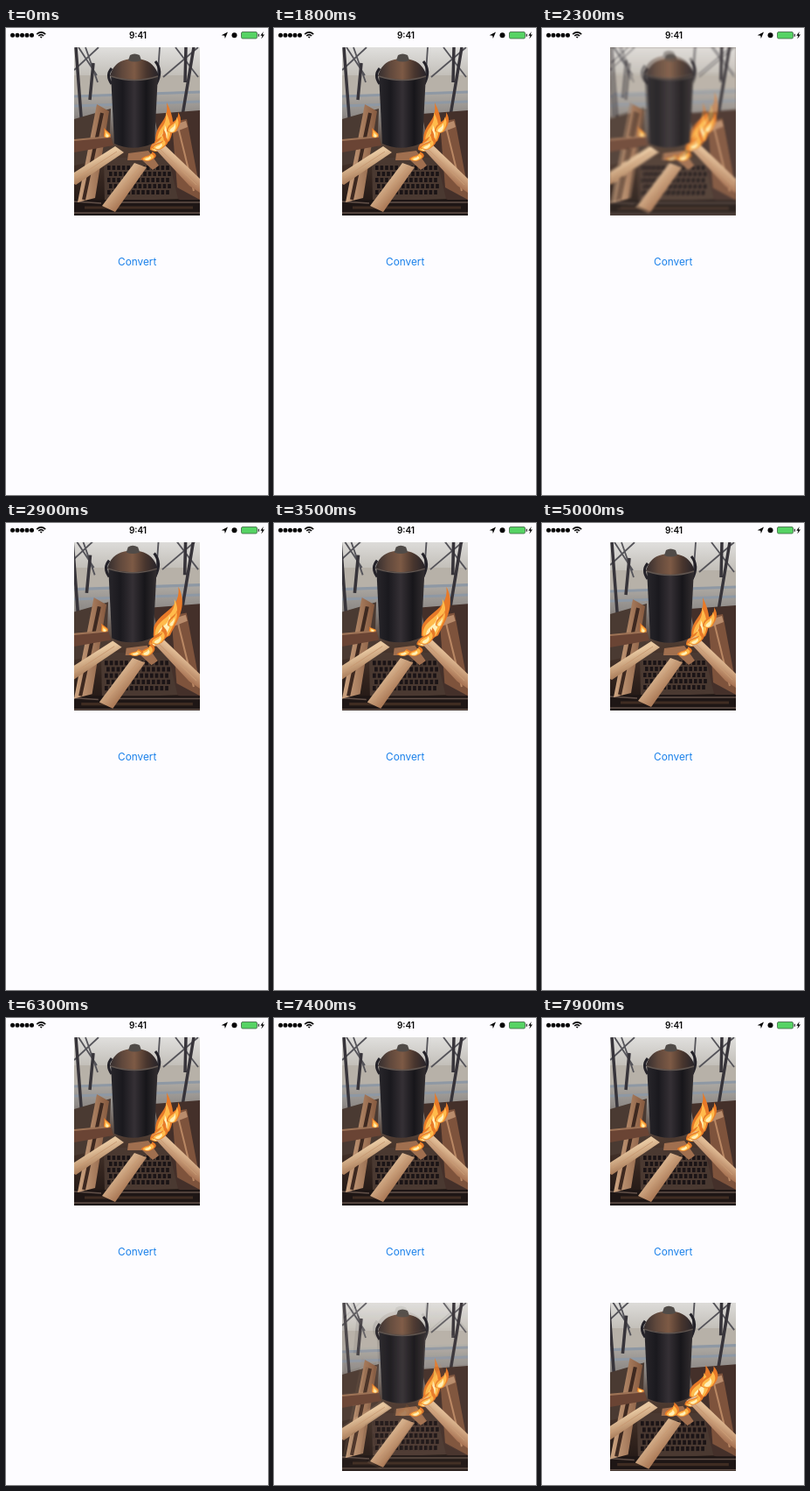
Animation of 300 by 533 pixels, one loop 8000 ms. Source, as an HTML page with a canvas:

```html
<!DOCTYPE html>
<html lang="en">
<head>
<meta charset="utf-8">
<title>Convert</title>
<style>
html, body { margin: 0; width: 100%; height: 100%; overflow: hidden; background: #fdfcff; }
svg, canvas { position: absolute; display: block; }
svg { left: 0; top: 0; }
canvas { left: 78px; width: 144px; height: 192px; }
#first { top: 22px; }
#second { top: 325px; }
text { font-family: Inter, Roboto, sans-serif; text-anchor: middle; }
</style>
</head>
<body>
<svg width="300" height="533" viewBox="0 0 300 533">
  <path d="M7.5 8.3H30" stroke="#050505" stroke-width="5" stroke-linecap="round" stroke-dasharray="0 5.5"/>
  <g fill="none" stroke="#050505" stroke-width="1.6">
    <path d="M35.2 7.2Q40.2 2.7 45.2 7.2M37.2 9Q40.2 6.4 43.2 9"/>
    <path d="M38.6 9.7H41.8L40.2 11.7Z" fill="#050505" stroke="none"/>
  </g>
  <text x="151" y="12" font-size="10" font-weight="600" fill="#050505">9:41</text>
  <path d="M254 4.5L250.8 12L250.2 8.8L246.7 8.2Z" fill="#050505"/>
  <circle cx="261.5" cy="8.2" r="3" fill="#050505"/>
  <rect x="269.5" y="4.5" width="18" height="7.5" rx="1.5" fill="#56d364" stroke="#3b6540" stroke-width=".8"/>
  <path d="M289.3 6.7v3" stroke="#202020" stroke-width="1.2"/>
  <path d="M294.8 4L291.3 8.8H293.4L292.3 12.5L296 7.5H293.8Z" fill="#050505"/>
  <text x="150.2" y="271" font-size="11.8" fill="#1a80ea">Convert</text>
</svg>
<canvas id="first" width="144" height="192"></canvas>
<canvas id="second" width="144" height="192"></canvas>
<script>
const W = 144, H = 192, LOOP = 8000, STEP = 100;
const first = document.getElementById('first');
const second = document.getElementById('second');
const layer = document.createElement('canvas');
layer.width = W;
layer.height = H;
const g = layer.getContext('2d');

const clamp = v => Math.max(0, Math.min(1, v));
const ramp = (t, from, to) => {
  const p = clamp((t - from) / (to - from));
  return p * p * (3 - 2 * p);
};

function gradient(x0, y0, x1, y1, ...colors) {
  const fill = g.createLinearGradient(x0, y0, x1, y1);
  colors.forEach((c, i) => fill.addColorStop(i / (colors.length - 1), c));
  return fill;
}
function shape(d, fill) {
  g.fillStyle = fill;
  g.fill(new Path2D(d));
}
function line(d, color, width) {
  g.strokeStyle = color;
  g.lineWidth = width;
  g.stroke(new Path2D(d));
}

function flame(x, y, w, h, lean) {
  const layers = [['#e87a28', 1], ['#ffbb4c', .75], ['#fff0b8', .42]];
  for (const [color, k] of layers) {
    const a = w * k, b = h * k, tip = x + lean * k;
    shape(`M${x - a} ${y}C${x - a} ${y - b * .5} ${tip + a * .3} ${y - b * .45} ${tip} ${y - b}
      C${tip + a} ${y - b * .6} ${x + a * 1.5} ${y - b * .3} ${x + a * .8} ${y}
      Q${x} ${y + a * .6} ${x - a} ${y}Z`, color);
  }
}

function backdrop() {
  g.fillStyle = gradient(0, 0, 0, H, '#e0dfdd', '#bdb9b2', '#8f8b88', '#4d3a30', '#33241e', '#1c1412');
  g.fillRect(0, 0, W, H);
  shape('M0 32H144V50L0 55Z', '#b7b1a8');
  line('M0 56L144 51M0 67L144 62', '#8e98a4', 3);
  line('M5 0L26 32M28 0L0 26M13 0L27 40M98 0L95 42M116 0L142 34M142 0L102 34', '#55545a', 1.8);
  line('M2 0L9 92M22 18L18 60M137 0L124 78M128 0L127 40', '#37343a', 3.5);
  shape('M0 82L42 70L40 126L0 135Z', '#4a3a32');
  shape('M91 76L144 72V184L112 170Z', '#44302a');
}

function firebox() {
  shape('M34 126L108 126L119 173L35 176Z', '#4a3931');
  for (let row = 0; row < 5; row++)
    for (let col = 0; col < 13; col++) {
      g.fillStyle = '#1b1416';
      g.fillRect(38 + col * 5.6 + row % 2 * 2, 135 + row * 7, 3.6, 5);
    }
  shape('M0 174H144V192H0Z', '#1e1615');
  line('M0 176L31 178M50 177H144M0 189H144', '#625048', 1.5);
  line('M12 183H136', '#3f2c22', 3);
}

function pot() {
  line('M43 24Q36 32 43 42M93 16Q102 27 94 42', '#242229', 3);
  shape('M42 30H96L92 109Q68 120 46 110Z',
    gradient(42, 0, 96, 0, '#28262b', '#1a191e', '#353035', '#17161a', '#342f31'));
  shape('M41 33Q45 17 60 14Q68 12 78 14Q92 17 97 33Q69 41 41 33Z',
    gradient(41, 0, 97, 0, '#342d2e', '#60483c', '#7d5a45', '#49362e', '#262329'));
  line('M42 33Q69 42 96 33', '#615650', 1.5);
  shape('M62 15L64 9Q69 6 75 9L77 15Q69 18 62 15Z', '#504b48');
}

function logs() {
  shape('M26 65L40 73L24 172L4 177Z', gradient(5, 0, 38, 0, '#cda481', '#895d42'));
  line('M32 75L11 174', '#3e2920', 4);
  shape('M112 85L129 82L144 162V174L118 160Z', '#7e533c');
  line('M118 87L137 164', '#b98763', 2);
  shape('M110 90L128 84L130 91L112 98Z', '#b98c6c');
  shape('M0 106L42 101L45 112L0 120Z', '#6a4434');
  line('M0 106L42 102', '#9e7356', 2);
}

function frontLogs() {
  shape('M0 143L47 113L57 120L2 157L0 156Z', gradient(10, 132, 17, 150, '#e7c7a0', '#ad805d'));
  shape('M32 181L69 132L83 137L47 188Z', gradient(39, 165, 53, 178, '#d9b48f', '#ad7c59'));
  shape('M89 112L99 107L144 150V166L132 158Z', gradient(117, 125, 107, 139, '#e2bd96', '#a97555'));
  shape('M62 121L85 118L97 135L90 140L78 129L61 129Z', '#a06f4f');
  line('M3 149L49 119M40 178L76 136M97 115L140 157', '#c99b74', 1);
}

// beat is 0 at rest; age is playback time in seconds
function scene(beat, age) {
  const pulse = Math.cos(10.6 * (age - 1.5));
  const sway = Math.sin(7 * age);
  g.setTransform(1, 0, 0, 1, 0, 0);
  g.save();
  if (beat) {
    g.translate(W / 2 - 2, H / 2 - 1);
    g.scale(1.03, 1.03);
    g.translate(-W / 2, -H / 2);
  }
  backdrop();
  firebox();
  logs();
  flame(38, 102, 4, beat ? 8 + 4 * sway : 10, -4);
  flame(102, 107, beat ? 11 : 9, beat ? 44 + 10 * pulse : 44, beat ? 13 + 5 * pulse : 4);
  flame(112, 96, beat ? 6 - 2 * pulse : 6, 22, 7);
  flame(94, 117, 7, beat ? 22 + 5 * sway : 24, 8);
  pot();
  frontLogs();
  flame(84, 128, 7, beat ? 13 + 4 * sway : 9, 5);
  flame(96, 115, 7, beat ? 14 + 3 * pulse : 13, 8);
  if (beat) flame(72, 128, 7, 10 - 4 * pulse, 3);
  g.restore();
}

function photo(canvas, mix, age) {
  const c = canvas.getContext('2d');
  const soft = 4 * mix * (1 - mix);
  c.fillStyle = '#6b5c55';
  c.fillRect(0, 0, W, H);
  const paint = (beat, alpha) => {
    scene(beat, age);
    c.globalAlpha = alpha;
    c.filter = `blur(${.6 + soft * .4}px)`;
    c.drawImage(layer, 0, 0);
  };
  paint(0, 1);
  if (mix > 0) paint(1, mix);
  c.filter = 'none';
  c.globalAlpha = soft * .08;
  c.fillStyle = '#ead9c0';
  c.fillRect(0, 0, W, H);
  c.globalAlpha = 1;
}

let last = -1;
function draw(now) {
  const t = Math.floor(now % LOOP / STEP) * STEP;
  if (t !== last) {
    last = t;
    photo(first, ramp(t, 2000, 2600) - ramp(t, 4100, 4600), (t - 2000) / 1000);
    const shown = t >= 7200;
    second.style.display = shown ? 'block' : 'none';
    if (shown) photo(second, ramp(t, 7300, 7800), (t - 7300) / 1000);
  }
  requestAnimationFrame(draw);
}
draw(performance.now());
</script>
</body>
</html>
```
